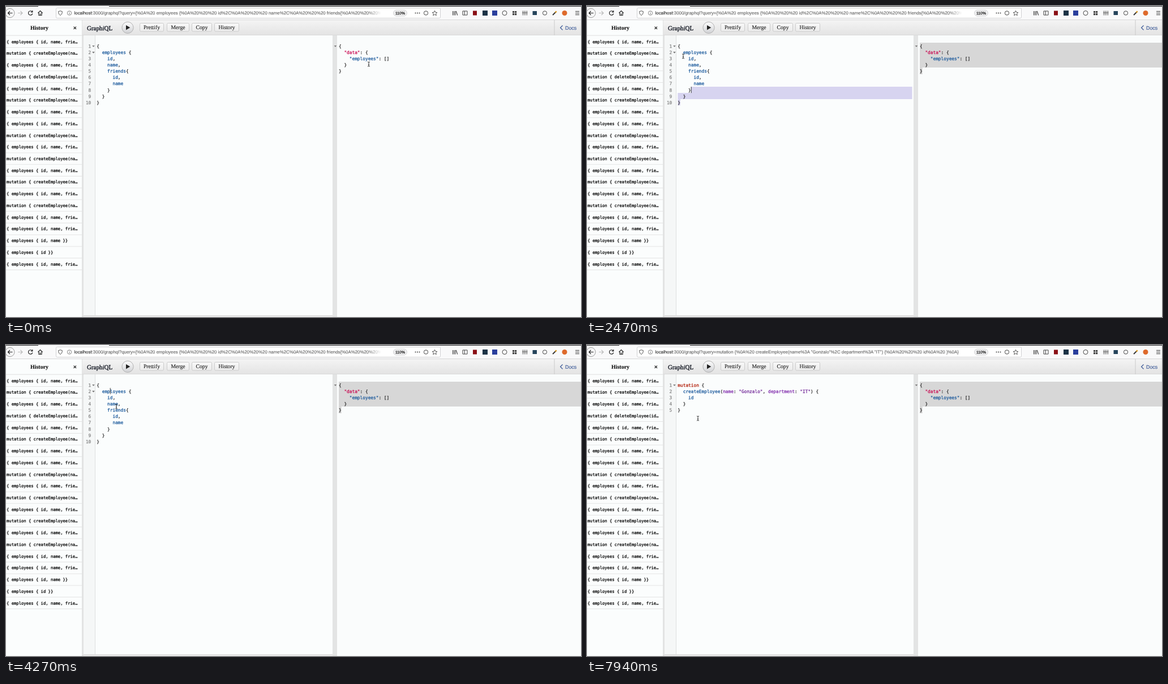
Animation, 1016 px wide and 551 px high, one loop 8000 ms. Source, as an HTML page with a canvas:

```html
<!DOCTYPE html>
<html lang="en">
<head>
<meta charset="utf-8">
<title>GraphiQL session</title>
<style>
html, body { margin: 0; width: 100%; height: 100%; overflow: hidden; background: #fff; }
canvas { display: block; width: 1016px; height: 551px; }
</style>
</head>
<body>
<canvas id="stage"></canvas>
<script>
const W = 1016, H = 551, LOOP = 8000;
const canvas = document.getElementById('stage');
const dpr = window.devicePixelRatio || 1;
canvas.width = W * dpr;
canvas.height = H * dpr;
const c = canvas.getContext('2d');
c.scale(dpr, dpr);
c.textRendering = 'geometricPrecision';

const MONO = '"DejaVu Sans Mono", monospace';
const SERIF = '"Liberation Serif", serif';
const SANS = '"Liberation Sans", sans-serif';
const CODE_FONT = `7.8px ${MONO}`;
const CHAR = 4.696, LINE = 11.11, CODE_TOP = 65;
const LEFT = 160.3, RIGHT = 588;

// ---------- drawing helpers ----------
function rect(x, y, w, h, fill) {
  c.fillStyle = fill;
  c.fillRect(x, y, w, h);
}
// A hairline outline gives the text its slightly heavy weight
function text(s, x, y, font, fill, align = 'left', weight = 0.25) {
  c.font = font;
  c.fillStyle = c.strokeStyle = fill;
  c.textAlign = align;
  c.lineWidth = weight;
  c.fillText(s, x, y);
  c.strokeText(s, x, y);
}
function poly(points, fill) {
  c.beginPath();
  points.forEach(([x, y]) => c.lineTo(x, y));
  c.closePath();
  c.fillStyle = fill;
  c.fill();
}
function stroke(d, color = '#444', width = 1) {
  c.strokeStyle = color;
  c.lineWidth = width;
  c.stroke(new Path2D(d));
}
function disc(x, y, r, fill) {
  c.beginPath();
  c.arc(x, y, r, 0, 7);
  c.fillStyle = fill;
  c.fill();
}
function ring(x, y, r, color = '#444', width = 1) {
  c.beginPath();
  c.arc(x, y, r, 0, 7);
  c.strokeStyle = color;
  c.lineWidth = width;
  c.stroke();
}
function box(x, y, w, h, r, fill, border) {
  c.beginPath();
  c.roundRect(x, y, w, h, r);
  c.fillStyle = fill;
  c.fill();
  c.strokeStyle = border;
  c.lineWidth = 1;
  c.stroke();
}
function shade(y0, y1, from, to) {
  const g = c.createLinearGradient(0, y0, 0, y1);
  g.addColorStop(0, from);
  g.addColorStop(1, to);
  return g;
}

// ---------- content ----------
const QUERY = ['{', '  employees {', '    id,', '    name,', '    friends{',
  '      id,', '      name', '    }', '  }', '}'];
const MUTATION = ['mutation {', '  createEmployee(name: "Gonzalo", department: "IT") {',
  '    id', '  }', '}'];
const RESULT = ['{', '  "data": {', '    "employees": []', '  }', '}'];

const HOST = 'localhost';
const QUERY_URL = ':3000/graphql?query={%0A%20 employees {%0A%20%20%20 id%2C%0A%20%20%20 name%2C' +
  '%0A%20%20%20 friends{%0A%20%20%20%20%20 id%2C';
const MUTATION_URL = ':3000/graphql?query=mutation {%0A%20 createEmployee(name%3A "Gonzalo"%2C ' +
  'department%3A "IT") {%0A%20%20%20 id%0A%20 }%0A}';

const ENTRIES = {
  E: '{ employees { id, name, frie…',
  M: 'mutation { createEmployee(na…',
  D: 'mutation { deleteEmployee(id…',
  N: '{ employees { id, name }}',
  I: '{ employees { id }}'
};
const HISTORY = 'EMEDEMEEMEMEMEMEENIE';

// ---------- timeline ----------
const EDITOR_FOCUS = 1820, CLICK = 5000;

// Pointer moves: first step, last step, step count, points on the way
const MOVES = [
  [0, 0, 1, [641, 103]],
  [120, 120, 1, [617, 97]],
  [360, 1090, 9, [609, 108], [595, 126]],
  [1180, 1180, 1, [579, 61]],
  [1270, 1910, 8, [400, 130], [208, 187]],
  [2030, 2380, 5, [208, 197], [176, 130]],
  [2470, 2470, 1, [170, 89]],
  [2560, 2820, 4, [172, 75], [181, 77]],
  [2910, 2910, 1, [181, 80]],
  [3450, 3650, 3, [196, 110]],
  [3830, 4270, 6, [204, 112], [195, 109]],
  [4630, 4907, 4, [60, 166]],
  [5092, 5370, 4, [290, 80]],
  [5460, 6060, 7, [326, 81], [281, 82]],
  [6510, 6510, 1, [281, 83]],
  [7680, 7940, 4, [196, 130]]
];

function pointerAt(t) {
  let from = MOVES[0][3], pos = from;
  for (const [t0, t1, n, ...pts] of MOVES) {
    if (t < t0) break;
    const gap = n > 1 ? (t1 - t0) / (n - 1) : 1;
    const step = Math.min(n, Math.floor((t - t0) / gap + 0.001) + 1);
    const path = [from, ...pts];
    const u = step / n * pts.length;
    const i = Math.min(pts.length - 1, Math.floor(u));
    const [a, b] = [path[i], path[i + 1]];
    pos = [0, 1].map(k => a[k] + (b[k] - a[k]) * (u - i));
    from = pts[pts.length - 1];
  }
  return pos;
}

// Caret in the query editor: time, line, column, text selected to the end
const CARETS = [
  [EDITOR_FOCUS, 9, 1, false],
  [2380, 8, 3, true],
  [2470, 7, 5, true],
  [2560, 2, 2, true],
  [2650, 0, 1, true],
  [3180, 1, 5, false]
];
const caretAt = t => t >= CLICK ? undefined : CARETS.filter(k => k[0] <= t).pop();

// ---------- code panes ----------
const lineTop = i => Math.round(CODE_TOP + i * LINE);

function colorOf(token, next) {
  if (token === 'mutation') return '#b11a04';
  if (token === '"data"') return '#c8054e';
  if (token === '"employees"') return '#17569a';
  if (token[0] === '"') return '#6f2496';
  if (/\w/.test(token)) return next === ':' ? '#7d26aa' : '#17569a';
  return '#2b2b2b';
}
function code(lines, x) {
  lines.forEach((line, i) => {
    for (const m of line.matchAll(/"\w+"|\w+|[^\w"]+/g)) {
      const fill = colorOf(m[0], line[m.index + m[0].length]);
      text(m[0], x + m.index * CHAR, 73.8 + i * LINE, CODE_FONT, fill);
    }
  });
}
function select(x, right, line, col, last, fill) {
  const start = x + col * CHAR;
  const [top, next, end, bottom] = [line, line + 1, last, last + 1].map(lineTop);
  rect(start, top, right - start, next - top, fill);
  rect(x, next, right - x, end - next, fill);
  rect(x, end, CHAR, bottom - end, fill);
}
function fold(x, line) {
  const y = 70 + line * LINE;
  poly([[x - 2.3, y], [x + 2.3, y], [x, y + 2.8]], '#777');
}

function editor(t) {
  const lines = t < CLICK ? QUERY : MUTATION;
  const caret = caretAt(t);
  rect(137, 52, 440, 496, '#fbfdfd');
  rect(137, 52, 20, 496, '#f5f7f7');
  rect(157, 52, 1, 496, '#dddfdf');
  if (caret && caret[3]) select(LEFT, 574.5, caret[1], caret[2], 9, '#d7d4f0');
  lines.forEach((_, i) => text(i + 1, 150.3, 73.8 + i * LINE, CODE_FONT, '#858585', 'right'));
  fold(154.5, 0);
  if (t < CLICK) fold(154.5, 1);
  code(lines, LEFT);
  const blink = t >= 3650 && t < 4180;
  if (caret && !blink) rect(LEFT + caret[2] * CHAR, lineTop(caret[1]), 0.8, LINE, '#111');
  rect(137, 548, 440, 1, '#d6d6d6');
  rect(137, 549, 440, 2, '#eee');
}

function result(t) {
  rect(585, 52, 431, 499, '#fafcfc');
  rect(577, 52, 8, 499, '#e3e4e4');
  if (t >= 1180) select(RIGHT, W, 0, 0, 4, t < EDITOR_FOCUS ? '#d7d4f0' : '#d7d7d7');
  fold(582, 0);
  code(RESULT, RIGHT);
}

// ---------- browser and page chrome ----------
function icons() {
  ring(7, 12.5, 8, '#999');
  stroke('M11.5 12.5H3.5M7 9L3.5 12.5L7 16', '#222', 1.2);
  stroke('M21 12.5H29M25.5 9L29 12.5L25.5 16', '#bbb', 1.2);
  stroke('M46 10A3.7 3.7 0 1 0 46.8 13.5M46.8 8V11H43.8', '#222', 1.2);
  stroke('M56.5 12.5L60.5 8.5L64.5 12.5M58 12V16.5H63V12M60.5 16.5V13.5', '#222', 1.2);
  stroke('M96 8.7L99.3 9.7C99.3 13.5 98.5 15 96 16.5C93.5 15 92.7 13.5 92.7 9.7Z', '#555');
  ring(112, 12.5, 3.7, '#666', 0.8);
  rect(111.6, 12, 0.9, 2.6, '#666');
  rect(111.6, 10.3, 0.9, 0.9, '#666');
  for (const x of [723.5, 727, 730.5]) disc(x, 12.5, 1, '#444');
  ring(742, 12.5, 3.6, '#444');
  stroke('M757.5 8.3L758.8 11.2L761.9 11.5L759.6 13.6L760.3 16.7L757.5 15.1L754.7 16.7' +
    'L755.4 13.6L753.1 11.5L756.2 11.2Z', '#444', 0.9);
  stroke('M789.5 9V16.5M791.8 9V16.5M794 9V16.5M795.2 9L797.8 16.5', '#444', 1.1);
  stroke('M807 9H815V16H807ZM810.3 9V16', '#444');
  rect(825, 8.5, 7, 8, '#8a1016');
  rect(842, 8, 9, 9, '#1b3346');
  rect(859, 8, 9, 9, '#2a3f9d');
  ring(881, 12.5, 4, '#444');
  for (const [x, y] of [[895, 9], [899, 9], [895, 13], [899, 13]]) rect(x, y, 3.2, 3.2, '#444');
  stroke('M913 8.5V16.5M915.5 8.5V16.5M918 8.5V16.5M920.5 8.5V16.5M912 12H921.5', '#555', 0.9);
  rect(930.5, 9, 7.5, 7, '#27455c');
  ring(952, 12.5, 3.6, '#444');
  stroke('M966 16L971 11', '#333', 1.8);
  stroke('M970.5 11.5L972.7 9.3', '#d89a28', 2.5);
  disc(987, 12.5, 4.5, '#de6a2c');
  stroke('M1006 9.5H1013M1006 12.5H1013M1006 15.5H1013', '#333', 1.1);
}

function browser(t) {
  rect(0, 0, W, 24, '#f9f9fa');
  rect(0, 0, 57, 1, '#2a2a2c');
  rect(182, 0, W - 182, 1, '#2a2a2c');
  rect(0, 24, W, 1, '#d6d6d7');
  box(88.5, 3.5, 679, 18, 2, '#fff', '#d0d0d2');
  const font = `7.89px ${SANS}`;
  c.save();
  c.beginPath();
  c.rect(118, 4, 545, 17);
  c.clip();
  text(HOST, 120.5, 15.4, font, '#222', 'left', 0.1);
  const x = 120.5 + c.measureText(HOST).width;
  text(t < CLICK ? QUERY_URL : MUTATION_URL, x, 15.4, font, '#606060', 'left', 0.1);
  c.restore();
  if (t < CLICK) {
    const fade = c.createLinearGradient(640, 0, 663, 0);
    fade.addColorStop(0, '#ffffff00');
    fade.addColorStop(1, '#ffffff');
    rect(640, 5, 24, 15, fade);
  }
  box(684.5, 7, 24, 11, 5.5, '#efeff0', '#d4d4d6');
  text('110%', 696.5, 15, `6.8px ${SANS}`, '#222', 'center');
  icons();
}

function toolbar() {
  rect(135, 25, W - 135, 27, shade(25, 52, '#f4f4f4', '#e3e3e3'));
  rect(135, 51.5, W - 135, 0.8, '#d2d2d2');
  const logo = `11px ${SERIF}`;
  let x = 143;
  for (const [part, font] of [['Graph', logo], ['i', 'italic ' + logo], ['QL', logo]]) {
    text(part, x, 42.6, font, '#141823', 'left', 0.35);
    x += c.measureText(part).width;
  }
  disc(215, 38.3, 10.3, shade(28, 48, '#fdfdfd', '#d2d3d6'));
  ring(215, 38.3, 10.1, '#b0b0b0');
  poly([[212, 34], [219.3, 38.2], [212, 42.4]], '#222');
  for (const [label, left, right] of [['Prettify', 236.5, 278.5], ['Merge', 284.5, 323.5],
    ['Copy', 328.5, 363.5], ['History', 368.5, 411.5]]) {
    box(left, 30.5, right - left, 14.5, 2, shade(30, 45, '#f9f9f9', '#ececec'), '#cbcbcb');
    text(label, (left + right) / 2, 40.8, `9.7px ${SERIF}`, '#222', 'center', 0.15);
  }
  rect(968.5, 25, 1, 27, '#cacaca');
  stroke('M983.5 34.5L979.5 38.5L983.5 42.5', '#3b5998', 1.2);
  text('Docs', 988, 41.6, `8.9px ${SANS}`, '#3b5998', 'left', 0.15);
}

function sidebar() {
  rect(0, 25, 134, 526, '#fbfdfd');
  rect(134, 25, 3, 526, '#e2e3e3');
  text('History', 59, 41.6, `bold 10px ${SERIF}`, '#111', 'center', 0.1);
  stroke('M119.6 36.6L124 41M124 36.6L119.6 41', '#222', 1.2);
  rect(0, 51.7, 134, 0.8, '#d6d6d6');
  [...HISTORY].forEach((key, i) => {
    const y = 65.6 + i * 20.74;
    text(ENTRIES[key], 1, y, `7.2px ${MONO}`, '#000');
    rect(0, y + 7.4, 134, 0.8, '#dedede');
  });
}

// ---------- pointer ----------
function pointer(t) {
  const [x, y] = pointerAt(t);
  c.save();
  c.translate(x, y);
  if (x > 575 && x < 586) {
    const cross = 'M-3 0H3M0 -3V3';
    stroke(cross, '#fff', 3);
    stroke(cross, '#111', 1.3);
    for (let i = 0; i < 4; i++) {
      poly([[2.2, -2], [4.6, 0], [2.2, 2]], '#111');
      c.rotate(Math.PI / 2);
    }
  } else if (x < 158) {
    const arrow = 'M0 0V9.5L2.2 7.5L3.7 11L5.2 10.3L3.7 7H6.7Z';
    c.fillStyle = '#111';
    c.fill(new Path2D(arrow));
    stroke(arrow, '#fff', 0.7);
  } else {
    const beam = 'M-2 -4Q0 -4 0 -3V3Q0 4 -2 4M2 -4Q0 -4 0 -3M2 4Q0 4 0 3M-1 1H1';
    stroke(beam, '#222', 0.9);
  }
  c.restore();
}

function draw(now) {
  const t = now % LOOP;
  rect(0, 0, W, H, '#fff');
  sidebar();
  toolbar();
  editor(t);
  result(t);
  browser(t);
  pointer(t);
}

let start;
function tick(now) {
  start ??= now;
  draw(Math.max(0, now - start));
  requestAnimationFrame(tick);
}
requestAnimationFrame(tick);
</script>
</body>
</html>
```
